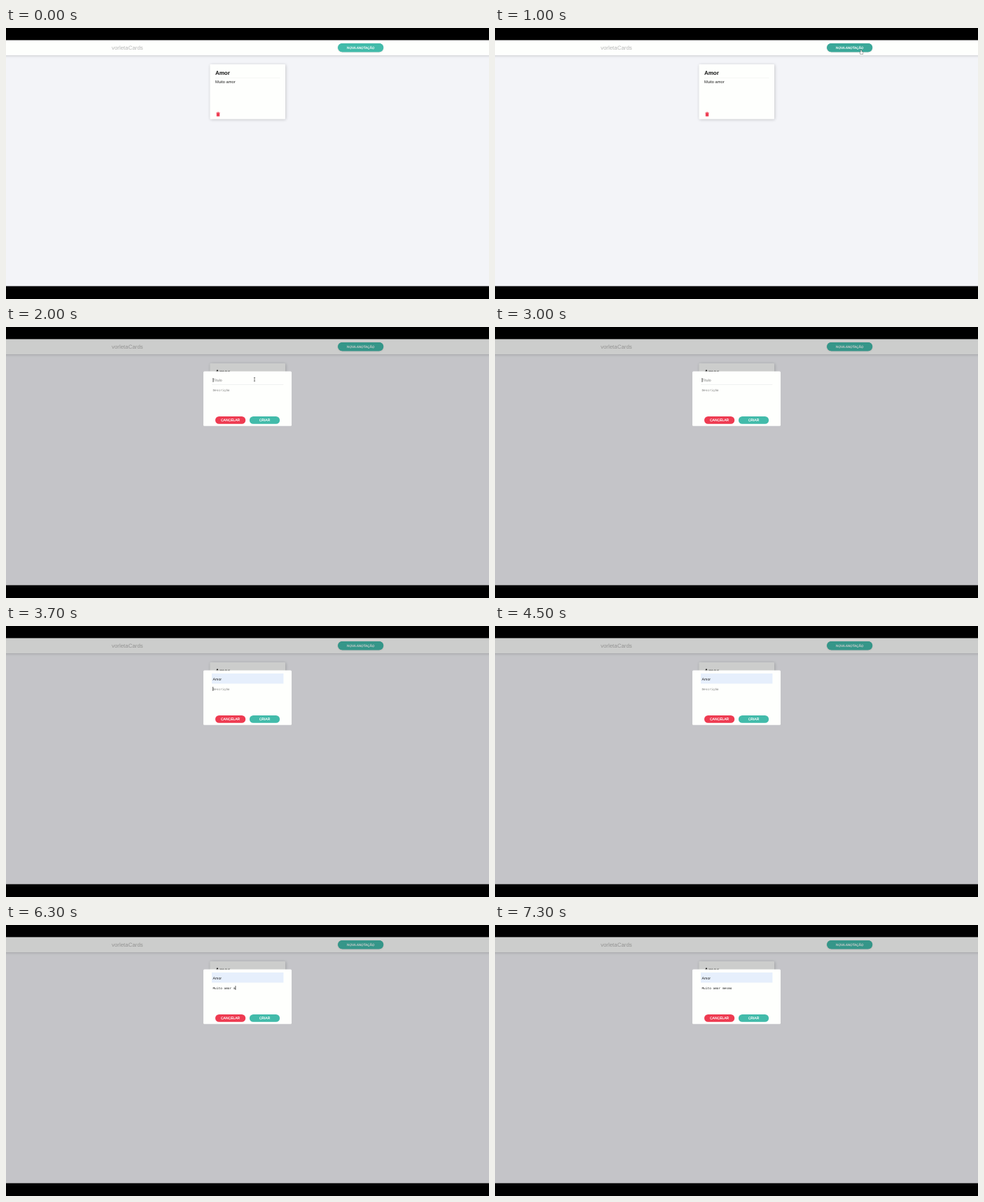
Animation, 690 px wide and 388 px high, one loop 8 s. Source, as an HTML page with a canvas:

```html
<!DOCTYPE html>
<html lang="pt">
<head>
<meta charset="utf-8">
<title>Notas</title>
<style>
  html, body { margin: 0; width: 100%; height: 100%; overflow: hidden; background: #000; }
  canvas { display: block; width: 690px; height: 388px; }
</style>
</head>
<body>
<canvas id="stage"></canvas>
<script>
const W = 690, H = 388, LOOP = 8000, STEP = 100;
const TOP = 17.4, BOTTOM = 369.6;
const SANS = '"Liberation Sans", Arial, sans-serif';
const MONO = '"Liberation Mono", monospace';
const TEAL = '#42bbaa', TEAL_HOVER = '#3aa899', RED = '#ee3b51';
const PAPER = '#fefffd', INK = '#1c1c1c', HINT = '#777';

const canvas = document.getElementById('stage');
const scale = window.devicePixelRatio || 1;
canvas.width = W * scale;
canvas.height = H * scale;
const ctx = canvas.getContext('2d');
ctx.scale(scale, scale);
ctx.textRendering = 'geometricPrecision';
ctx.lineJoin = 'round';

const linear = k => k;
const smooth = k => k * k * (3 - 2 * k);
const between = (t, a, b) => t >= a && t < b;

// Interpolates rows of [time, ...values]; holds the last row.
function track(rows, t, ease) {
  const i = rows.findIndex(row => row[0] > t);
  if (i < 0) return rows[rows.length - 1].slice(1);
  const [a, b] = [rows[Math.max(0, i - 1)], rows[i]];
  const k = ease(Math.max(0, (t - a[0]) / (b[0] - a[0] || 1)));
  return a.slice(1).map((v, n) => v + (b[n + 1] - v) * k);
}

function rect(x, y, w, h, color) {
  ctx.fillStyle = color;
  ctx.fillRect(x, y, w, h);
}

function round(x, y, w, h, r, color) {
  ctx.fillStyle = color;
  ctx.beginPath();
  ctx.roundRect(x, y, w, h, r);
  ctx.fill();
}

function shadowed(alpha, blur, dx, dy, draw) {
  ctx.save();
  ctx.shadowColor = `rgba(0,0,0,${alpha})`;
  ctx.shadowBlur = blur * scale;
  ctx.shadowOffsetX = dx * scale;
  ctx.shadowOffsetY = dy * scale;
  draw();
  ctx.restore();
}

function text(str, x, y, font, color) {
  ctx.font = font;
  ctx.fillStyle = color;
  ctx.fillText(str, x, y);
}

function pill(x, y, w, h, color, label, size) {
  round(x, y, w, h, h / 2, color);
  ctx.textAlign = 'center';
  text(label, x + w / 2, y + h / 2 + size * .36, `${size}px ${SANS}`, '#fff');
  ctx.lineWidth = .18;
  ctx.strokeStyle = '#fff';
  ctx.strokeText(label, x + w / 2, y + h / 2 + size * .36);
  ctx.textAlign = 'left';
}

const MOUSE = [
  [200, 396, 139.5], [1000, 523.2, 31.7], [1200, 522.6, 30.8],
  [1700, 355, 75], [2200, 355, 75], [2700, 341, 83],
  [3900, 334, 105], [4500, 328, 99]
];
const mouseAt = t => track(MOUSE, t, smooth);
const mouseShown = t => between(t, 200, 2700) || between(t, 4000, 4500);

function overButton(t) {
  const [x, y] = mouseAt(t);
  return mouseShown(t) && x > 474 && x < 539 && y < 34.5;
}

function drawHand() {
  for (const [grow, color] of [[.35, '#444'], [0, '#fff']]) {
    round(-.6 - grow, -grow, 1.2 + 2 * grow, 4 + 2 * grow, .6, color);
    round(-1.5 - grow, 2.4 - grow, 4 + 2 * grow, 3.4 + 2 * grow, 1, color);
  }
}

function drawArrow() {
  const shape = new Path2D('M0 0V5.2L1.2 4.2 2 6 2.8 5.6 2.1 3.9H3.7Z');
  ctx.lineWidth = .7;
  ctx.strokeStyle = '#fff';
  ctx.stroke(shape);
  ctx.fillStyle = '#111';
  ctx.fill(shape);
}

function drawBeam() {
  rect(-.3, -2.8, .6, 5.6, '#333');
  for (const y of [-3, 2.5]) rect(-1.1, y, 2.2, .5, '#333');
}

function drawMouse(t) {
  if (!mouseShown(t)) return;
  const [x, y] = mouseAt(t);
  const overField = t > 1200 && between(x, 294, 396) && y > 68;
  ctx.save();
  ctx.translate(x, y);
  (overButton(t) ? drawHand : overField ? drawBeam : drawArrow)();
  ctx.restore();
}

function drawPage(t) {
  rect(0, 0, W, H, '#f3f4f8');
  shadowed(.17, 3.5, 0, .8, () => rect(-9, TOP, W + 18, 39 - TOP, PAPER));
  text('vorletaCards', 151, 30.7, '7.9px ' + SANS, '#b6b6b6');

  const color = overButton(t) ? TEAL_HOVER : TEAL;
  shadowed(.2, 2, 0, .6, () => round(474.2, 22, 65, 12.2, 6.1, color));
  pill(474.2, 22, 65, 12.2, color, 'NOVA ANOTAÇÃO', 4.65);

  shadowed(.2, 4, .7, .7, () => round(291.4, 52, 107.6, 78.6, 1, PAPER));
  text('Amor', 298.9, 67, 'bold 8.06px ' + SANS, '#111');
  rect(299, 71, 92.5, .5, '#ebecec');
  text('Muito amor', 298.9, 79, '5.75px ' + SANS, '#222');

  rect(300.4, 120.9, 5.2, .8, RED);
  rect(301.9, 120.4, 2.2, .6, RED);
  round(300.8, 122, 4.4, 4.6, .6, RED);
}

const BODY = 'Muito amor mesmo';
const TYPING = [[4700, 1.65], [5600, 9.25], [6700, 14.25], [6800, 16.25]];

function typed(t) {
  return t < TYPING[0][0] ? '' : BODY.slice(0, Math.floor(track(TYPING, t, linear)[0]));
}

// The caret blinks every half second from its focus time.
function caret(t, from, to, x, y) {
  if (between(t, from, to) && (t - from) % 1000 < 500) rect(x, y, .7, 6, '#222');
}

function drawModal(t) {
  rect(0, TOP, W, BOTTOM - TOP, 'rgba(0,0,0,.195)');
  round(282, 63.5, 126, 78.3, 1.6, PAPER);

  const filled = t >= 3200;
  if (filled) rect(294, 68, 102.4, 14.5, '#e6effc');
  else rect(294, 82, 102.4, .6, '#e8e9e9');
  text(filled ? 'Amor' : 'Título', 295.6, 77.5, '5.2px ' + SANS, filled ? INK : HINT);
  caret(t, 2000, 3200, 295.6, 73);
  caret(t, 3400, 3700, 308.1, 73);

  const body = typed(t);
  text(body || 'Descrição', 295.4, 91.6, '4.48px ' + MONO, body ? INK : HINT);
  const end = 295.4 + ctx.measureText(body).width;
  caret(t, 3700, 4700, end, 87);
  if (between(t, 4700, 7300)) rect(end, 87, .7, 6, '#222');

  pill(299, 128, 43.2, 10.8, RED, 'CANCELAR', 5);
  pill(347.9, 128, 43.2, 10.8, TEAL, 'CRIAR', 5);
}

function render(now) {
  const t = Math.floor((now % LOOP) / STEP) * STEP;
  drawPage(t);
  if (t >= 1200) drawModal(t);
  drawMouse(t);
  rect(0, 0, W, TOP, '#000');
  rect(0, BOTTOM, W, H - BOTTOM, '#000');
}

const start = performance.now();
function tick() {
  render(performance.now() - start);
  requestAnimationFrame(tick);
}
tick();
</script>
</body>
</html>
```
